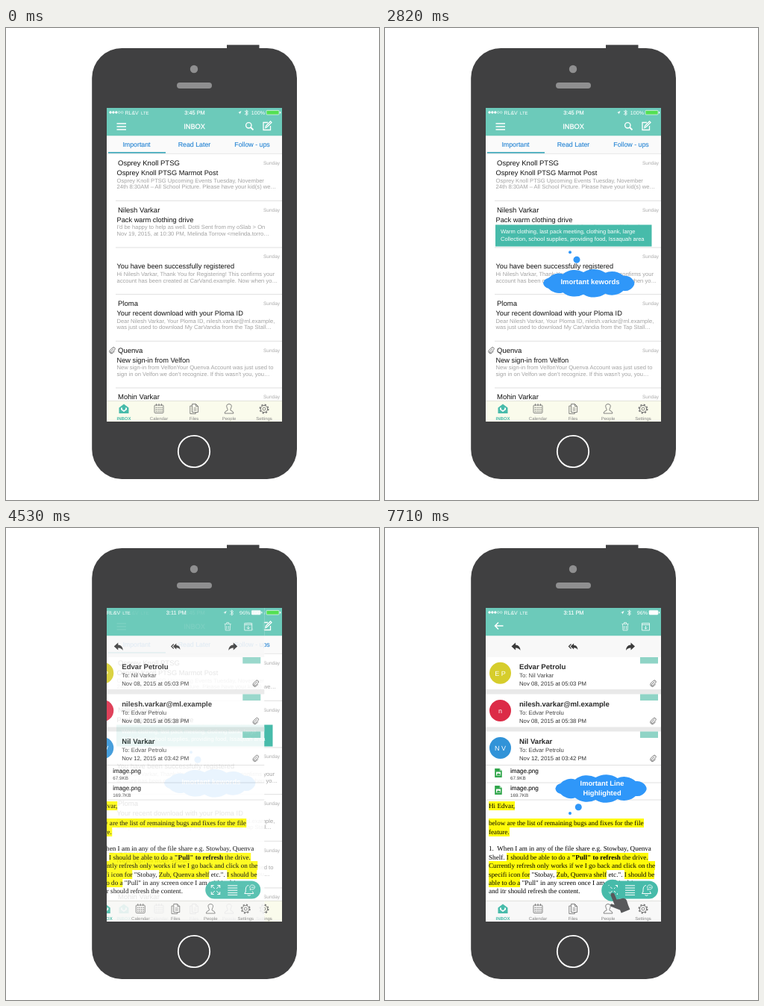
Animation of 500 by 632 pixels, one loop 8 s. Source, as an HTML page:

```html
<!DOCTYPE html>
<html lang="en">
<head>
<meta charset="utf-8">
<title>Mail app walkthrough</title>
<style>
html, body { margin: 0; width: 100%; height: 100%; overflow: hidden; background: #fff; }
#stage { position: relative; width: 500px; height: 632px; overflow: hidden; }
svg, .layer { position: absolute; left: 0; top: 0; width: 500px; height: 632px; }
svg { font-family: "Liberation Sans", Arial, sans-serif; text-rendering: geometricPrecision; }
#screen { clip-path: inset(107px 130px 105px 135px); }
#letter div {
  position: absolute; left: 139px; height: 11.4px; line-height: 11.4px; white-space: pre;
  font-family: "Liberation Serif", "Times New Roman", serif; font-size: 9.15px; color: #000;
  text-rendering: geometricPrecision;
}
mark { background: #fffb0a; color: inherit; padding: 1px 0; }
</style>
</head>
<body>
<div id="stage">
  <svg id="phone"></svg>
  <div id="screen" class="layer">
    <svg id="list"></svg>
    <svg id="keywords"></svg>
    <svg id="bubble1"></svg>
    <div id="detail" class="layer">
      <svg id="mail"></svg>
      <div id="letter"></div>
      <svg id="tools"></svg>
    </div>
    <svg id="bubble2"></svg>
    <svg id="tap1"></svg>
    <svg id="tap2"></svg>
  </div>
</div>
<script>
const $ = id => document.getElementById(id);
const TEAL = '#6ccaba', DEEP = '#47bbaa', BLUE = '#2f97f9';

// Drawing helpers
const rect = (x, y, w, h, fill, more = '') =>
  `<rect x="${x}" y="${y}" width="${w}" height="${h}" fill="${fill}" ${more}/>`;
const dot = (x, y, r, fill, more = '') =>
  `<circle cx="${x}" cy="${y}" r="${r}" fill="${fill}" ${more}/>`;
const text = (x, y, size, str, fill = '#111', more = '') =>
  `<text x="${x}" y="${y}" font-size="${size}" fill="${fill}" xml:space="preserve" ${more}>` +
  str.replace(/&/g, '&amp;').replace(/</g, '&lt;') + '</text>';
const MID = 'text-anchor="middle"', END = 'text-anchor="end"', BOLD = 'font-weight="700"';
const line = (d, color, w = 1, more = '') =>
  `<path d="${d}" fill="none" stroke="${color}" stroke-width="${w}" ${more}/>`;
const at = (x, y, body, more = '') => `<g transform="translate(${x} ${y}) ${more}">${body}</g>`;
const clip = (x, y) => at(x, y, line('M2.5-2.5L-1.5 1.5a1.2 1.2 0 0 0 1.7 1.7L4-.6a2.2 2.2 0 0 0-3.2-3.2L-3 0a3 3 0 0 0 4.2 4.2L4 1.4',
  '#666', 1), 'scale(.9)');

function statusBar(clock, charge, level, x) {
  let s = '';
  for (let i = 0; i < 5; i++)
    s += dot(140 + i * 3.9, 113, 1.4, i < 3 ? '#fff' : 'none', 'stroke="#fff" stroke-width=".5"');
  return s + text(159.5, 115.6, 7, 'RL&V', '#fff') + text(181, 115.6, 6, 'LTE', '#fff') +
    text(253, 115.8, 7.4, clock, '#fff', MID + ' stroke="#fff" stroke-width=".15"') +
    at(x, 113, '<path d="M-38 .2l4.500-2.200-2 4.600-.5-2.200z" fill="#fff"/>' +
      line('M-29-2l4.500 4-2.200 2v-7l2.200 2-4.500 4', '#fff', .8)) +
    text(x - 2, 115.7, 7.1, charge, '#fff', END) +
    rect(x, 110.4, 366 - x, 5.6, level, 'rx="1" stroke="#fff" stroke-width=".6"') +
    rect(367, 112, 1.2, 2.4, '#fff');
}

function tabBar(bg) {
  const g = '#777';
  let cal = rect(-6, -5, 12, 10.5, 'none', `rx="1" stroke="${g}" stroke-width=".9"`) + line('M-3.5-7v3M0-7v3M3.5-7v3', g, .9);
  for (let i = 0; i < 12; i++) cal += rect(-4.2 + i % 4 * 2.5, -2.4 + (i >> 2) * 2.5, 1.3, 1.3, g);
  const icons = [
    `<path d="M-6.5-1.5L0-6.5l6.5 5V6h-13z" fill="${DEEP}"/>` + '<path d="M-4-1.5h8v2.6L0 4l-4-2.9z" fill="#fff"/>' + dot(0, -.5, 2.2, DEEP),
    cal,
    line('M-2.5-6.5h5l3 3v8h-8zM2.5-6.5v3h3M-3-4h-2.2V6.5h7.5v-2M-.5-1H3.5M-.5 1.5h4', g, .9),
    line('M-6 6q0-3 4-4v-1.7q-3.4-6.5 2-6.8q5.400 .3 2 6.800v1.700q4 1 4 4z', g, .9),
    dot(0, 0, 4.6, 'none', `stroke="${g}"`) + dot(0, 0, 2, 'none', `stroke="${g}" stroke-width=".9"`) +
      dot(0, 0, 5.7, 'none', `stroke="${g}" stroke-width="1.6" stroke-dasharray="2.2 2.277"`)
  ];
  const names = ['INBOX', 'Calendar', 'Files', 'People', 'Settings'];
  return rect(134, 499, 237, 29, bg) + line('M134 499.300H371', '#d6d6d0', .7) +
    icons.map((icon, i) => {
      const x = 158 + i * 47;
      return at(x, 510, icon) + text(x, 525, 6, names[i], i ? '#888' : DEEP, i ? MID : MID + ' ' + BOLD);
    }).join('');
}

// Phone body
$('phone').innerHTML = rect(296, 22.6, 43.5, 8, '#404041') + rect(115.2, 27, 274.8, 577, '#404041', 'rx="40"') +
  dot(252, 55, 5.2, '#8f8f90') + rect(229, 73, 47, 8, '#8f8f90', 'rx="4"') +
  dot(252, 567, 21.2, 'none', 'stroke="#fff" stroke-width="1.8"');

// Inbox
const mails = [
  ['Osprey Knoll PTSG', 'Osprey Knoll PTSG Marmot Post',
    'Osprey Knoll PTSG Upcoming Events Tuesday, November', '24th 8:30AM – All School Picture. Please have your kid(s) we…'],
  ['Nilesh Varkar', 'Pack warm clothing drive',
    "I'd be happy to help as well. Dotti Sent from my oSlab > On", 'Nov 19, 2015, at 10:30 PM, Melinda Torrow <melinda.torro…'],
  ['', 'You have been successfully registered',
    'Hi Nilesh Varkar, Thank You for Registering! This confirms your', 'account has been created at CarVand.example. Now when yo…'],
  ['Ploma', 'Your recent download with your Ploma ID',
    'Dear Nilesh Varkar, Your Ploma ID, nilesh.varkar@ml.example,', 'was just used to download My CarVandia from the Tap Stall…'],
  ['Quenva', 'New sign-in from Velfon',
    'New sign-in from VelfonYour Quenva Account was just used to', "sign in on Velfon we don't recognize. If this wasn't you, you…"],
  ['Mohin Varkar', '', '', '']
];
$('list').innerHTML = rect(134, 107, 237, 421, '#fff') + rect(134, 107, 237, 37.5, TEAL) +
  statusBar('3:45 PM', '100%', '#53e052', 349) +
  line('M148.500 128h12.500M148.500 132h12.500M148.500 136h12.500', '#fff', 1.5) +
  text(252.5, 135, 9.2, 'INBOX', '#fff', MID + ' stroke="#fff" stroke-width=".3"') +
  dot(325.3, 130.3, 3.7, 'none', 'stroke="#fff" stroke-width="1.4"') + line('M328 133l3.500 3.500', '#fff', 1.8) +
  line('M351 126.500h-6v10h9.500v-5.500M348 133.500l.5-2.500 6-6 1.500 1.500-6 6z', '#fff', 1.3) +
  rect(134, 144.5, 237, 24, '#fafafa') + line('M134 168.400H371', '#e2e2e2', .8) +
  ['Important', 'Read Later', 'Follow - ups'].map((s, i) =>
    text([175, 252.5, 330][i], 159.3, 8.8, s, '#2484d4', MID + ' stroke="#2484d4" stroke-width=".12"')).join('') +
  rect(137, 166, 77, 1.7, '#40a9bb') +
  mails.map(([from, subject, a, b], i) => {
    const y = 184 + i * 62.65;
    return text(150, y, 9.5, from) + text(367, y - 1, 6.5, 'Sunday', '#aaa', END) +
      text(148.5, y + 13, 9.25, subject) + text(148.5, y + 22.6, 7.6, a, '#a2a2a2') +
      text(148.5, y + 31.4, 7.6, b, '#a2a2a2') + line(`M147 ${y + 47.3}H371`, '#d9d9d9', .8);
  }).join('') + clip(142, 431.5) + tabBar('#fafbec');

// Keyword strip
$('keywords').innerHTML = rect(148, 263.5, 209.5, 29, DEEP) +
  text(155, 275, 7.55, 'Warm clothing, last pack meeting, clothing bank, large', '#fff') +
  text(155, 285.2, 7.55, 'Collection, school supplies, providing food, Issaquah area', '#fff');

// Thought bubbles
function cloud(cx, cy) {
  const n = 13, rx = 61.5, ry = 15;
  const p = i => [cx + rx * Math.cos((i + .5) * 2 * Math.PI / n), cy + ry * Math.sin((i + .5) * 2 * Math.PI / n)];
  let d = 'M' + p(0);
  for (let i = 1; i <= n; i++) {
    const [x, y] = p(i), [u, v] = p(i - 1), r = Math.hypot(x - u, y - v) * .92;
    d += `A${r} ${r} 0 0 1 ${x} ${y}`;
  }
  return `<path d="${d}Z" fill="${BLUE}"/>`;
}
$('bubble1').innerHTML = cloud(273.5, 341.8) + dot(257, 310.3, 4.5, BLUE) + dot(248, 300.2, 2, BLUE) +
  text(275, 343.2, 9.5, 'Imortant kewords', '#fff', MID + ' ' + BOLD);
$('bubble2').innerHTML = cloud(289.8, 349) + dot(259.3, 373.8, 4.5, BLUE) + dot(248, 382, 2, BLUE) +
  text(291, 345.3, 9.3, 'Imortant Line', '#fff', MID + ' ' + BOLD) +
  text(291, 358.4, 9.3, 'Highlighted', '#fff', MID + ' ' + BOLD);

// Opened mail
const people = [
  ['Edvar Petrolu', 'Nil Varkar', 'Nov 08, 2015 at 05:03 PM', 'E P', '#d6cd2c', 189, 173],
  ['nilesh.varkar@ml.example', 'Edvar Petrolu', 'Nov 08, 2015 at 05:38 PM', 'n', '#dc2b47', 239.3, 222.5],
  ['Nil Varkar', 'Edvar Petrolu', 'Nov 12, 2015 at 03:42 PM', 'N V', '#3193d8', 289.3, 272.5]
];
const reply = 'M-6-.5L-.5-5.500v3q6 0 6.500 7.500q-2-3.500-6.500-3.500v3z';
const arrow = (x, more) => at(x, 159, `<path d="${reply}" fill="#3a3a3a"/>`, more);
const file = y => at(152, y, '<path d="M-4.800-6h6.500l3 3v9h-9.500z" fill="#2fa54a"/>' +
  '<path d="M1.700-6v3h3z" fill="#a9dcb4"/>' + rect(-3, -1.5, 6, 5, '#fff') + '<path d="M-2.500 3l2-3 1.300 1.500 1-1 .9 2.500z" fill="#2fa54a"/>');
$('mail').innerHTML = rect(134, 107, 237, 421, '#fff') + rect(134, 107, 237, 37.5, TEAL) +
  statusBar('3:11 PM', '96%', '#fff', 354) +
  line('M158.500 131H147.500M152 126.500l-4.500 4.500 4.500 4.500', '#fff', 1.5) +
  line('M317.500 128.500h9M320.500 128v-1.500h3v1.500M318.500 129l.5 8h6l.5-8M320.700 131v4.500M323.300 131v4.500', '#fff', .9, 'opacity=".8"') +
  line('M344.500 127.500h10v9.500h-10zM344.500 129.500h10M349.500 131v4M347.700 133.400l1.800 1.800 1.800-1.800', '#fff', 1, 'opacity=".8"') +
  rect(134, 144.5, 237, 28.5, '#f8f8f8') +
  arrow(175.5, '') + arrow(253.5, 'scale(.8)') + line('M249.500 155.500l-3 3 3 3', '#3a3a3a', 1.2) + arrow(329, 'scale(-1 1)') +
  rect(134, 216, 237, 6.5, '#e9e9e9') + rect(134, 266.5, 237, 6, '#e9e9e9') +
  people.map(([name, to, date, mark, color, y, top]) =>
    rect(342, top, 24, 8.5, '#8fd4c6') + dot(154.5, y + 5.3, 14.5, color) +
    text(154.5, y + 8.5, 9, mark, '#fff', MID) + text(180, y, 9.6, name, '#2a2a2a', BOLD) +
    text(180, y + 11, 7.8, 'To: ' + to, '#444') + text(180, y + 21.7, 7.75, date, '#333') + clip(359, y + 19)).join('') +
  line('M134 317.500H371M134 341H371M134 364H371', '#d8d8d8', .8) + file(328) + file(351) +
  text(168, 327.6, 8.1, 'image.png', '#222', 'stroke="#222" stroke-width=".15"') + text(168, 337.4, 6.3, '67.9KB', '#444') +
  text(168, 350.8, 8.1, 'image.png', '#222', 'stroke="#222" stroke-width=".15"') + text(168, 360.4, 6.3, '169.7KB', '#444');

const letter = [
  [373, '<mark>Hi Edvar,</mark>'],
  [396, '<mark>below are the list of remaining bugs and fixes for the file</mark>'],
  [407.4, '<mark>feature.</mark>'],
  [430, '1.  When I am in any of the file share e.g. Stowbay, Quenva'],
  [441.4, 'Shelf. <mark>I should be able to do a <b>"Pull" to refresh</b> the drive.</mark>'],
  [452.8, '<mark>Currently refresh only works if we I go back and click on the</mark>'],
  [464.2, '<mark>specifi icon for</mark> "Stobay, <mark>Zub, Quenva shelf</mark> etc.". <mark>I should be</mark>'],
  [475.6, '<mark>able to do a</mark> "Pull" in any screen once I am within drive'],
  [487, 'and itr should refresh the content.']
];
$('letter').innerHTML = letter.map(([y, s]) => `<div style="top:${y - 5.7}px">${s}</div>`).join('');

$('tools').innerHTML = rect(292, 472.5, 74, 24, DEEP, 'rx="12"') +
  line('M300 482v-3.500h3.500M300 478.500l4.500 4.500M308 478.500h3.500v3.500M311.500 478.500l-4.500 4.500M300 487v3.500h3.500M300 490.500l4.500-4.500M311.500 487v3.500h-3.500M311.500 490.500l-4.500-4.500', '#fff', 1) +
  line('M322 478.800h13M322 482h13M322 485.200h13M322 488.400h13M322 491.300h13', '#fff', 1) +
  line('M350 478.500q-4 .5-4 6v2.500l-1.500 2.500h12l-1.500-3M348.500 491.500q2 1.500 4 0', '#fff', 1) +
  line('M355 478a3.600 3 0 1 1-1.500 5.800l-1.500 1 .2-2a3 3 0 0 1 2.800-4.800zM353.500 481.200h4', '#fff', .8) +
  tabBar('#f8f8f8');

// Tapping hand, centred on its ring
const hand = dot(0, 0, 12.6, 'none', `stroke="${DEEP}" stroke-width="3.800"`) +
  dot(0, 0, 6.8, 'none', `stroke="${DEEP}" stroke-width="2.600"`) +
  at(-.5, 3.5, '<path d="M-2.500 2.500a2.500 2.500 0 0 1 5 0V10l8 1.500q3.500 1 3.500 4L13.500 22v6H1.500v-4L-7.500 15.500q-1-2.500 1.500-3L-2.500 15z" fill="#58595b"/>',
    'rotate(-22) scale(1.05)');
$('tap1').innerHTML = at(295, 265, hand);
$('tap2').innerHTML = at(304.7, 485.3, hand);

// Motion: every change is linear and advances in 30 ms ticks
const LOOP = 8000, TICK = 30, RISE = 82;
const ramp = (t, start, length) => Math.min(1, Math.max(0, (t - start) / length));

function show(id, alpha, x = 0, y = 0) {
  const s = $(id).style;
  s.opacity = alpha;
  s.visibility = alpha > 0 ? 'visible' : 'hidden';
  s.transform = x || y ? `translate(${x}px, ${y}px)` : 'none';
}

function draw(t) {
  const tap1 = ramp(t, 720, 510), tap2 = ramp(t, 7170, 510), slide = ramp(t, 4020, 570);
  show('tap1', tap1 * (1 - ramp(t, 1410, 330)), 0, RISE * (1 - tap1));
  show('keywords', ramp(t, 2040, 300));
  show('bubble1', ramp(t, 2490, 300));
  show('detail', slide, -235 * (1 - slide));
  show('bubble2', ramp(t, 5250, 330));
  show('tap2', tap2, 0, RISE * (1 - tap2));
}

function frame() {
  const t = performance.now() % LOOP;
  draw(Math.floor(t / TICK) * TICK);
  requestAnimationFrame(frame);
}
frame();
</script>
</body>
</html>
```
